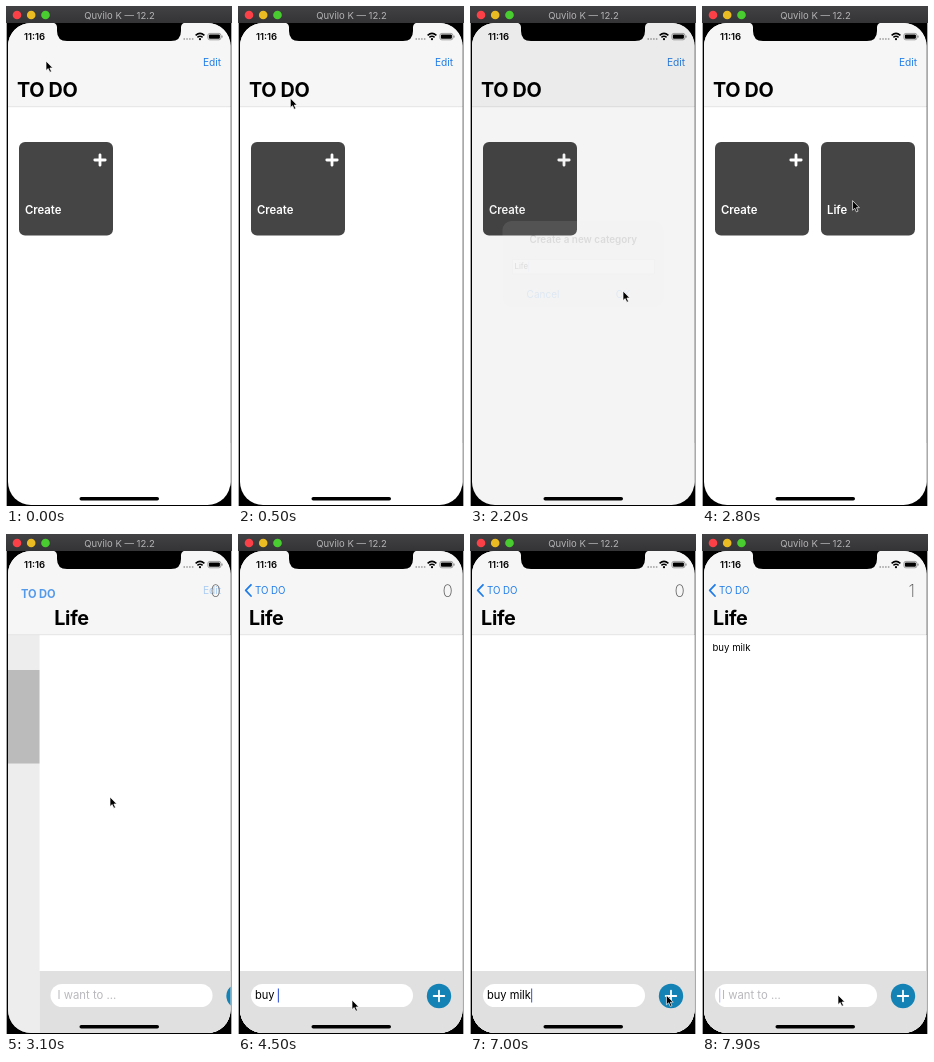
An HTML page that plays this animation: 226 by 500 pixels, repeating every 8 s.

```html
<!DOCTYPE html>
<html lang="en">
<head>
<meta charset="utf-8">
<title>To-do app demo</title>
<style>
  html, body { margin: 0; width: 100%; height: 100%; overflow: hidden; background: #000; }
  svg { display: block; width: 100vw; height: 100vh; }
  text { font-family: Inter, "Liberation Sans", sans-serif; white-space: pre; }
  .mid { text-anchor: middle; }
  .big { font-size: 19.8px; font-weight: 700; letter-spacing: -.3px; }
  .card { font-size: 11.3px; font-weight: 600; fill: #fff; }
  .link { fill: #1f7ce8; font-size: 10px; }
  .count { font-size: 17px; font-weight: 200; fill: #555; }
</style>
</head>
<body>
<svg viewBox="0 0 226 500" preserveAspectRatio="none">
  <defs>
    <clipPath id="screen"><rect x="2" y="17" width="222.5" height="482" rx="23"/></clipPath>
    <linearGradient id="chrome" x2="0" y2="1">
      <stop stop-color="#424143"/><stop offset="1" stop-color="#343335"/>
    </linearGradient>
  </defs>

  <rect width="226" height="500"/>
  <path d="M.5 17V500M225.5 17V500" stroke="#aaa"/>
  <rect width="226" height="17" fill="url(#chrome)"/>
  <circle cx="11" cy="9" r="4.3" fill="#fb4048"/>
  <circle cx="25.2" cy="9" r="4.3" fill="#eabb22"/>
  <circle cx="39.5" cy="9" r="4.3" fill="#48cc30"/>
  <text class="mid" x="113.5" y="12.6" font-size="9.5" fill="#b4b3b5">Quvilo K — 12.2</text>

  <g clip-path="url(#screen)">
    <rect y="17" width="226" height="483" fill="#fff"/>

    <g id="home">
      <rect x="13" y="136" width="94" height="93.5" rx="6" fill="#454546"/>
      <path d="M88.8 154h10.4M94 148.8v10.4" stroke="#fff" stroke-width="2.8" stroke-linecap="round"/>
      <text class="card" x="19" y="207.5">Create</text>
      <g id="newCard">
        <rect x="119" y="136" width="94" height="93.5" rx="6" fill="#454546"/>
        <text class="card" x="125" y="207.5">Life</text>
      </g>
    </g>
    <rect id="veil" y="101" width="226" height="399" fill="#e6e6e6"/>

    <g id="detail">
      <rect x="2" y="101" width="224" height="399" fill="#fff"/>
      <text id="item" x="10.5" y="117" font-size="9.6">buy milk</text>
      <rect x="2" y="437" width="224" height="63" fill="#e0e0e0"/>
      <rect x="13" y="450" width="162" height="23" rx="11.5" fill="#fff"/>
      <text id="hint" x="20" y="465.3" font-size="11.3" fill="#b9b9bd">I want to ...</text>
      <text id="entry" x="17" y="465.3" font-size="11.1"></text>
      <rect id="entryCaret" y="454.5" width="1.2" height="14" fill="#4562d8"/>
      <circle cx="201" cy="462" r="12.2" fill="#1482b4"/>
      <path d="M195.7 462h10.6M201 456.7v10.6" stroke="#fff" stroke-width="1.8" stroke-linecap="round"/>
    </g>

    <rect y="17" width="226" height="83.5" fill="#f6f6f6"/>
    <path d="M0 100.7H226" stroke="#dcdcdc" stroke-width=".7"/>
    <text id="edit" x="197" y="60" font-size="10.2">Edit</text>
    <text id="count" class="count mid" x="209.7" y="63"></text>
    <path id="chevron" d="M13 50.8l-5.3 5.6 5.3 5.6" fill="none" stroke="#1f7ce8" stroke-width="1.8" stroke-linecap="round" stroke-linejoin="round"/>
    <text id="title">TO DO</text>
    <text id="detailTitle" class="big" y="91">Life</text>

    <text x="18" y="34" font-size="9.5" font-weight="600">11:16</text>
    <path d="M177.5 33h10" stroke="#999" stroke-width="1.5" stroke-dasharray="1.5 1.3"/>
    <path d="M189.6 29.4q4.4-4 8.8 0M191.4 31.4q2.6-2.3 5.2 0" fill="none" stroke="#000" stroke-width="1.5"/>
    <circle cx="194" cy="33.2" r="1.1"/>
    <rect x="201.9" y="27.4" width="13" height="6.4" rx="1.9" fill="none" stroke="#777" stroke-width=".7"/>
    <rect x="202.9" y="28.4" width="11" height="4.4" rx="1"/>
    <path d="M216 29.6v2" stroke="#777"/>

    <rect id="dim" y="17" width="226" height="483"/>

    <g id="dialog">
      <rect x="32.5" y="215" width="161.5" height="86.5" rx="9" fill="#f3f3f4"/>
      <text class="mid" x="113.3" y="237" font-size="9.9" font-weight="600">Create a new category</text>
      <rect x="42.5" y="253.5" width="142" height="14.5" fill="#fff" stroke="#d2d2d4" stroke-width=".7"/>
      <text id="name" x="44.5" y="263.4" font-size="7.8"></text>
      <rect id="nameCaret" y="255.5" width="1.1" height="10" fill="#3c64e0"/>
      <path d="M32.5 275.5H194M113.3 275.5V301.5" stroke="#e8e8ea" stroke-width=".7"/>
      <text class="link mid" x="73" y="292">Cancel</text>
      <text class="link mid" x="153" y="292">OK</text>
    </g>

    <rect x="73.5" y="491" width="79.5" height="3.5" rx="1.75"/>
    <path d="M46 16.5q5 .5 5 5v3.500q0 10 10 10H165q10 0 10-10v-3.500q0-4.500 5-5Z"/>
  </g>

  <path id="pointer" d="M0 0V9.600L2.200 7.600 3.800 11.200 5.500 10.500 3.900 7H6.800Z" stroke="#fff" stroke-width=".7"/>
</svg>

<script>
const LOOP = 8000, WIDTH = 222;
const el = {};
document.querySelectorAll('svg [id]').forEach(node => el[node.id] = node);

const clamp = v => Math.min(1, Math.max(0, v));
const span = (t, from, to) => clamp((t - from) / (to - from));
const smooth = p => p * p * (3 - 2 * p);
const mix = (a, b, p) => a + (b - a) * p;
const set = (node, attrs) => {
  for (const key in attrs) node.setAttribute(key, attrs[key]);
};
const fade = (node, opacity) => set(node, { opacity: clamp(opacity) });

// Pointer stops: time, x, y
const stops = [
  [0, 40, 55], [100, 40, 55], [200, 41, 57], [400, 41, 57], [700, 84, 190], [850, 84, 190],
  [1100, 93, 253], [1700, 93, 253], [1980, 153, 285], [2250, 153, 285], [2600, 158, 190],
  [2840, 150, 195], [3100, 104, 263], [3700, 114, 466], [6650, 114, 466], [7050, 200, 461],
  [7350, 200, 461], [7800, 136, 461], [8000, 136, 461]
];
const nameKeys = [1300, 1420, 1560, 1690];
const entryKeys = [4050, 4170, 4290, 4490, 5700, 6080, 6400, 6590];

function pointerAt(t) {
  const i = stops.findIndex(stop => stop[0] > t);
  const [t0, x0, y0] = stops[i - 1], [t1, x1, y1] = stops[i];
  const p = smooth(span(t, t0, t1));
  return [mix(x0, x1, p), mix(y0, y1, p)];
}

const typed = (text, keys, t) =>
  text.slice(0, keys.filter(k => k <= t).length).replace(/ /g, '\u00a0');

function drawField(label, caret, text, t, resets) {
  label.textContent = text;
  const last = Math.max(...resets.filter(k => k <= t), 0);
  const phase = (t - last) % 1000;
  const x = +label.getAttribute('x') + (text ? label.getComputedTextLength() : 0);
  set(caret, { x: x + .1 });
  fade(caret, Math.abs(phase - 550) / 150);
}

function draw(t) {
  const shown = smooth(span(t, 800, 1080)) * (1 - smooth(span(t, 2020, 2245)));
  const push = 1 - (1 - span(t, 2838, 3388)) ** 3;
  const offset = WIDTH * (1 - push);
  const added = t >= 7300;

  const scale = t < 1500 ? mix(1.15, 1, shown) : 1;
  set(el.dialog, { transform: `translate(113 258) scale(${scale}) translate(-113 -258)` });
  fade(el.dialog, shown);
  fade(el.dim, .44 * shown);
  drawField(el.name, el.nameCaret, typed('Life', nameKeys, t), t, [1000, ...nameKeys]);

  set(el.home, { transform: `translate(${-.28 * WIDTH * push})` });
  fade(el.newCard, span(t, 2250, 2450));
  fade(el.veil, .85 * push);
  set(el.detail, { transform: `translate(${offset})` });

  // The large title shrinks into the back button
  const settled = push > .97;
  set(el.title, {
    x: mix(11, settled ? 17 : 15.6, push), y: mix(91, 60, push),
    'font-size': mix(19.8, 9.7, push),
    'font-weight': settled ? 400 : 700,
    'letter-spacing': -.3 * (1 - push),
    fill: push > 0 ? '#1f7ce8' : '#000'
  });
  fade(el.title, push > 0 && !settled ? .75 : 1);
  fade(el.chevron, (push - .9) * 12);
  set(el.detailTitle, { x: 11 + offset * 1.18 });
  fade(el.detailTitle, push * 3);
  set(el.edit, {
    fill: `rgb(${mix(31, 128, shown)},${mix(124, 128, shown)},${mix(232, 128, shown)})`
  });
  fade(el.edit, (1 - push) * 2.4);
  el.count.textContent = added ? '1' : '0';
  fade(el.count, push * 2 - .8);

  const text = added ? '' : typed('buy milk', entryKeys, t);
  drawField(el.entry, el.entryCaret, text, t, [3850, ...entryKeys, 7300]);
  if (t < 3850) fade(el.entryCaret, 0);
  fade(el.hint, text ? 0 : 1);
  fade(el.item, span(t, 7280, 7480));

  set(el.pointer, { transform: `translate(${pointerAt(t)})` });
}

const start = performance.now();
function tick() {
  draw((performance.now() - start) % LOOP);
  requestAnimationFrame(tick);
}
tick();
</script>
</body>
</html>
```
